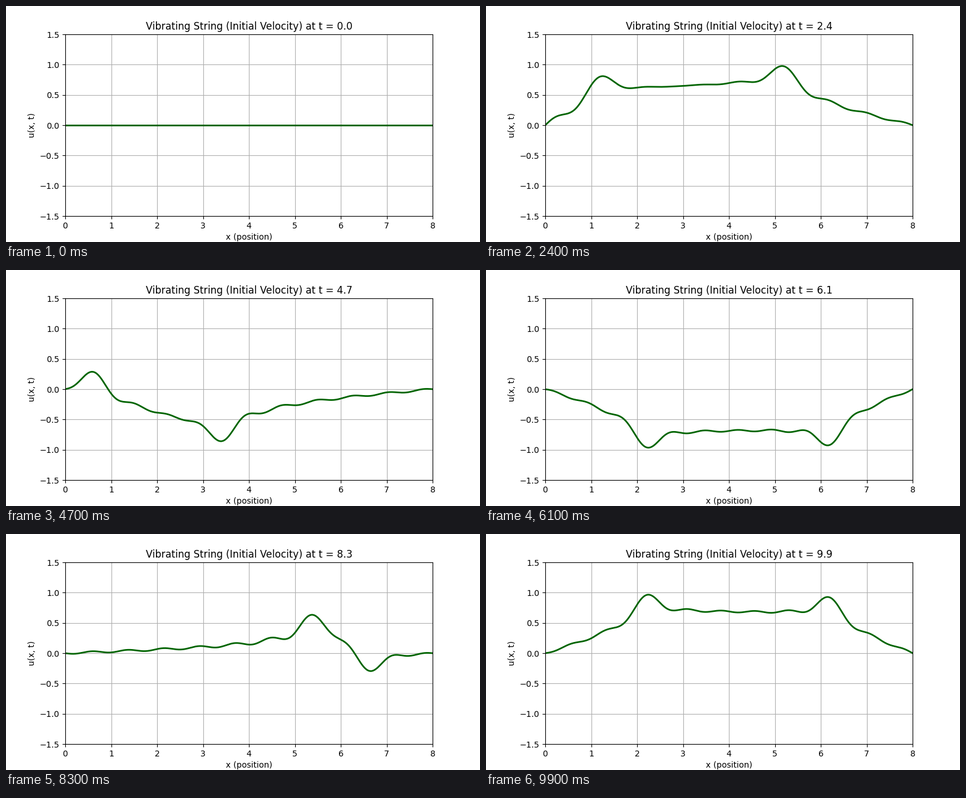
These frames come from a looping animation (800 by 400 pixels, 10 s). A matplotlib script:

```python
import numpy as np
import matplotlib.pyplot as plt
from matplotlib.animation import FuncAnimation

LENGTH = 8
SPEED = 2
KINK = 6
TERMS = 20
FRAMES = 100
STEP = 0.1

x = np.linspace(0, LENGTH, 500)
n = np.arange(1, TERMS + 1)
k = n * np.pi / LENGTH
amps = (-2 * np.cos(k * KINK) / (n * np.pi)
        + 16 * np.sin(k * KINK) / (3 * (n * np.pi) ** 2))
modes = np.sin(np.outer(x, k))


def displacement(t):
    return modes @ (amps * np.sin(k * SPEED * t))


fig, ax = plt.subplots(figsize=(8, 4), dpi=100)
line, = ax.plot(x, displacement(0), color="darkgreen", lw=2)
ax.set_xlim(0, LENGTH)
ax.set_ylim(-1.5, 1.5)
ax.set_xlabel("x (position)")
ax.set_ylabel("u(x, t)")
ax.grid(True)
title = ax.set_title("")


def update(frame):
    t = frame * STEP
    line.set_ydata(displacement(t))
    title.set_text(f"Vibrating String (Initial Velocity) at t = {t:.1f}")
    return line, title


anim = FuncAnimation(fig, update, frames=FRAMES, interval=100,
                     repeat=True, repeat_delay=0, blit=False)
plt.show()
```
